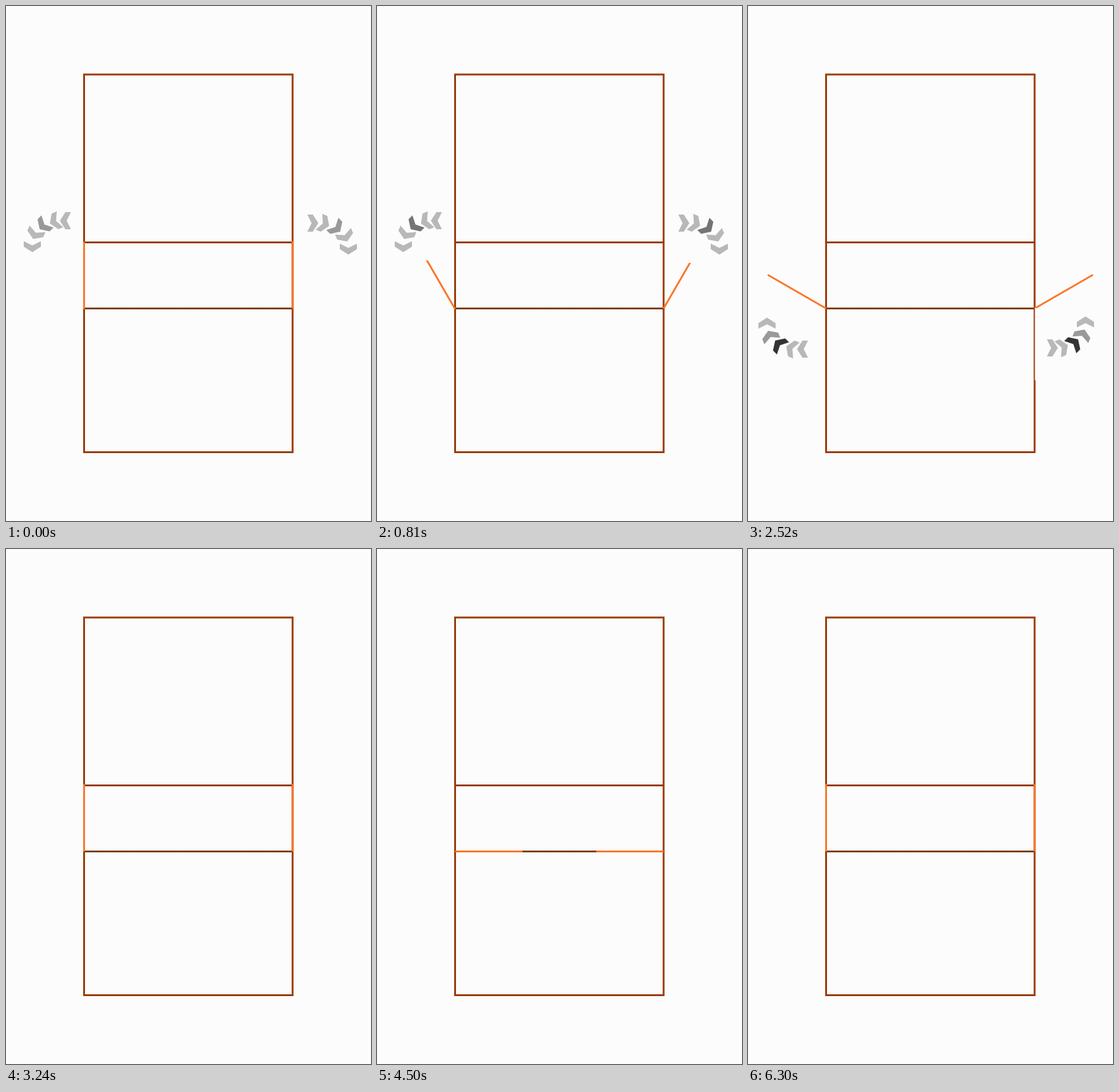
These frames come from a looping animation (596x842 px, 6750 ms). An HTML page with a canvas:

```html
<!DOCTYPE html>
<html>
<head>
<meta charset="utf-8">
<style>
html, body { margin: 0; width: 100%; height: 100%; overflow: hidden; background: #fcfcfc; }
canvas { display: block; }
</style>
</head>
<body>
<canvas id="stage" width="596" height="842"></canvas>
<script>
const ctx = document.getElementById('stage').getContext('2d');
const LOOP = 6750, PAPER = '#fcfcfc', BROWN = '#993a05', ORANGE = '#fb7628';
const LEFT = 127.5, RIGHT = 468, TOP = 112, SHELF = 386.5, FOLD = 494.5, BOTTOM = 729.5;
const FLAP = 110, CHEVRONS = 5;

// Flap angles: 0 is upright, positive swings outward.
// Arrows start at the given points and curve away from the box; bend 1 is down, -1 is up.
const softPulse = { start: 0, step: 135, rise: 1.3, fall: 1 };
const crispPulse = { start: 1.57, step: 142, rise: .56, fall: .56 };
const phases = [
  { show: [0, 1530], swing: [540, 1350], angle: [0, 90], hinge: FOLD + 1,
    left: [97, 351], right: [501, 355], bend: 1, pulse: crispPulse },
  { show: [2250, 3240], swing: [2250, 3060], angle: [90, 0], hinge: FOLD,
    left: [89, 561], right: [497, 559], bend: -1, pulse: softPulse },
  { show: [3600, 4500], swing: [3600, 4410], angle: [0, -90], hinge: FOLD,
    left: [77, 413], right: [514, 413], bend: 1, inward: true, pulse: softPulse },
  { show: [5220, 5970], swing: [5190, 5880], angle: [-90, 0], hinge: FOLD,
    left: [89, 415], right: [504, 415], bend: 1, pulse: softPulse }
];

function line(x1, y1, x2, y2, color, width = 3) {
  ctx.strokeStyle = color;
  ctx.lineWidth = width;
  ctx.beginPath();
  ctx.moveTo(x1, y1);
  ctx.lineTo(x2, y2);
  ctx.stroke();
}

function drawBox() {
  ctx.strokeStyle = BROWN;
  ctx.lineWidth = 3;
  ctx.strokeRect(LEFT, TOP, RIGHT - LEFT, BOTTOM - TOP);
  line(LEFT, SHELF, RIGHT, SHELF, BROWN);
  line(LEFT, FOLD, RIGHT, FOLD, BROWN);
  ctx.setLineDash([1, 2]);
  line(LEFT + 1.5, FOLD, RIGHT - 1, FOLD, '#4c4a20');
  ctx.setLineDash([]);
}

function drawFlap(x, y, side, degrees) {
  const a = degrees * Math.PI / 180;
  line(x, y, x + side * Math.sin(a) * FLAP, y - Math.cos(a) * FLAP, ORANGE);
}

function drawChevron(x, y, heading, level) {
  const shade = Math.round(184 - 133 * level);
  ctx.save();
  ctx.translate(x, y);
  ctx.rotate(heading);
  ctx.fillStyle = `rgb(${shade},${shade},${shade})`;
  ctx.beginPath();
  for (const [px, py] of [[-9, -14], [0, -14], [9, 0], [0, 14], [-9, 14], [-2, 0]]) ctx.lineTo(px, py);
  ctx.fill();
  ctx.restore();
}

function pulseLevel(index, elapsed, { start, step, rise, fall }) {
  const head = (start + elapsed / step) % CHEVRONS;
  let gap = index - head;
  if (gap > CHEVRONS / 2) gap -= CHEVRONS;
  if (gap < -CHEVRONS / 2) gap += CHEVRONS;
  return Math.max(0, 1 - (gap > 0 ? gap / rise : -gap / fall));
}

// A quarter turn of chevrons on an opaque panel that hides what lies beneath.
function drawArrow([x, y], side, { bend, inward, pulse }, elapsed) {
  const reach = 56 + 2 * side * bend, rise = 42.5;
  ctx.fillStyle = PAPER;
  ctx.fillRect(x - side * 28.5, y - bend * 53, side * (reach + 56), bend * (rise + 75.5));
  for (let i = 0; i < CHEVRONS; i++) {
    const turn = i / (CHEVRONS - 1) * Math.PI / 2;
    const px = x + side * reach * Math.sin(turn) ** 1.2;
    const py = y + bend * rise * (1 - Math.cos(turn)) ** 1.4;
    const heading = Math.atan2(bend * Math.sin(turn), side * Math.cos(turn)) + (inward ? Math.PI : 0);
    drawChevron(px, py, heading, pulseLevel(inward ? CHEVRONS - 1 - i : i, elapsed, pulse));
  }
}

function drawFlaps(t) {
  const { swing: [begin, end], angle: [from, to], hinge } =
    phases.findLast(({ swing }) => t >= swing[0]) || phases[0];
  const progress = Math.min(1, Math.max(0, (t - begin) / (end - begin)));
  const angle = from + (to - from) * progress;
  drawFlap(LEFT, hinge, -1, angle);
  drawFlap(RIGHT, FOLD, 1, angle);
}

function draw(t) {
  ctx.fillStyle = PAPER;
  ctx.fillRect(0, 0, 596, 842);
  drawBox();
  drawFlaps(t);
  const phase = phases.find(({ show }) => t >= show[0] && t < show[1]);
  if (!phase) return;
  drawArrow(phase.left, -1, phase, t - phase.show[0]);
  drawArrow(phase.right, 1, phase, t - phase.show[0]);
}

function tick() {
  draw(Math.floor(performance.now() % LOOP / 30) * 30);
  requestAnimationFrame(tick);
}
tick();
</script>
</body>
</html>
```
